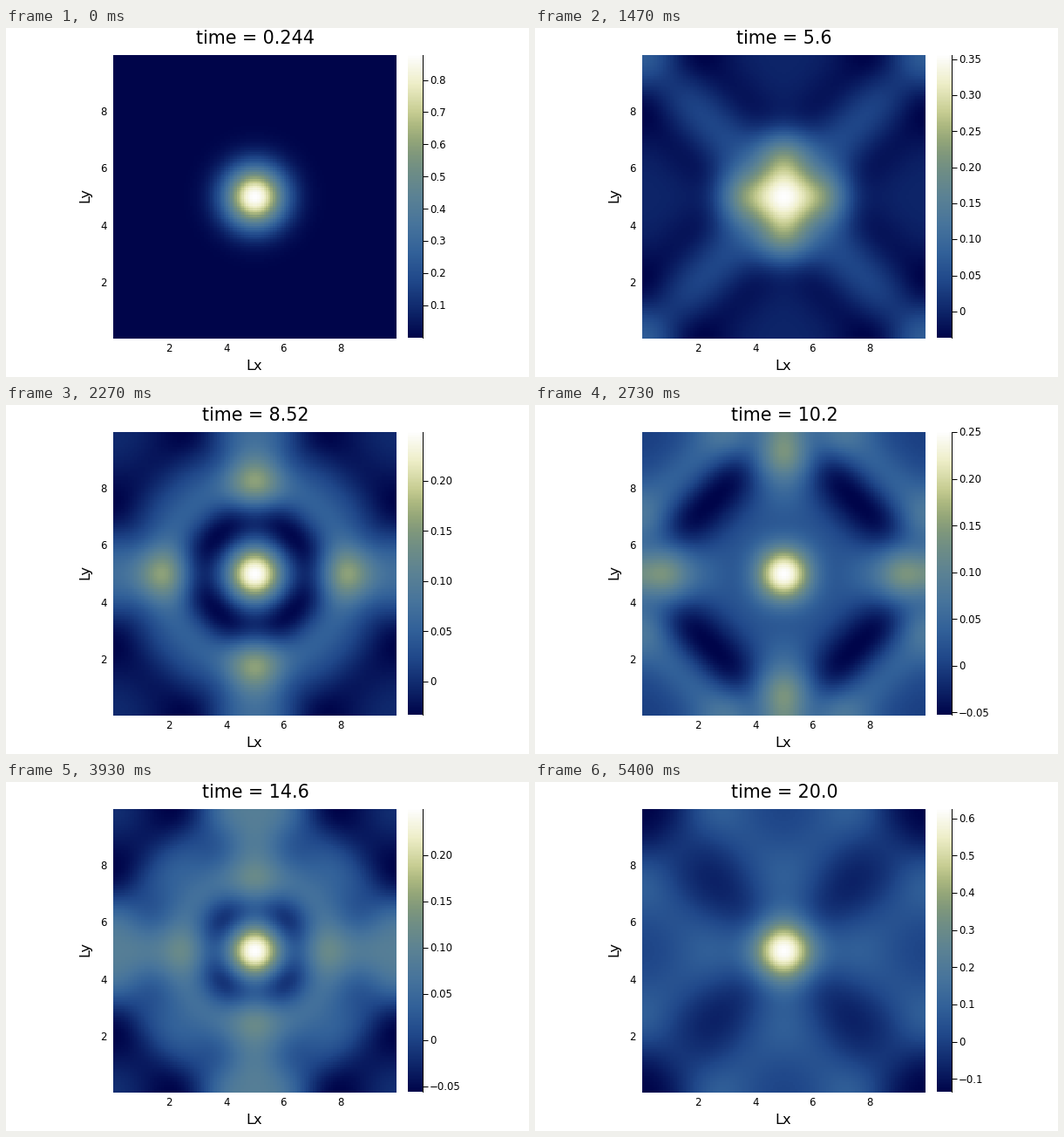
Write a matplotlib script that moves like this. It is 600x400 px and loops after 5470 ms.

```python
import math

import numpy as np
import matplotlib.pyplot as plt
from matplotlib.animation import FuncAnimation
from matplotlib.collections import LineCollection
from matplotlib.colors import LinearSegmentedColormap

W, H, DPI = 600, 400, 100

# fields change 15 times a second; ticks are finer to keep that rhythm
FIELDS, FIELD_MS = 82, 1000 / 15
LOOP_MS, TICKS = 5470, 274
TICK_MS = LOOP_MS / TICKS
ROUNDING_MS = 3.4

# physics and grid
SIZE, N = 10.0, 128
RHO = BULK = SHEAR = 1.0
STEPS_PER_FIELD = 10
DX = SIZE / N
DT = DX / math.sqrt((BULK + 4 / 3 * SHEAR) / RHO) / 2.1

# layout in pixels
LEFT, TOP, SIDE = 123, 31, 325
BAR_LEFT, BAR_RIGHT, BAR_TOP, BAR_BOTTOM = 460.5, 478, 31, 355
TITLE_PX, LABEL_PX, TICK_PX = 20.7, 16.3, 11.8

STOPS = [
    (0.0, (0, 5, 74)), (0.1, (15, 40, 108)), (0.2, (32, 72, 138)),
    (0.3, (50, 97, 153)), (0.4, (71, 116, 156)), (0.5, (91, 130, 148)),
    (0.6, (113, 143, 132)), (0.65, (128, 152, 124)), (0.7, (148, 166, 121)),
    (0.75, (172, 184, 128)), (0.8, (199, 205, 146)), (0.9, (238, 238, 200)),
    (1.0, (254, 254, 254)),
]
CMAP = LinearSegmentedColormap.from_list(
    "ice", [(pos, [c / 255 for c in rgb]) for pos, rgb in STOPS], N=256)

plt.rcParams["font.family"] = "DejaVu Sans"


def simulate():
    """Pressure fields of a wave with normal stresses and rigid walls."""
    x = (np.arange(N) + 0.5) * DX - SIZE / 2
    p = np.exp(-x[:, None] ** 2 - x[None, :] ** 2)
    txx, tyy = np.zeros((N, N)), np.zeros((N, N))
    vx, vy = np.zeros((N + 1, N)), np.zeros((N, N + 1))
    fields = []
    for step in range(1, FIELDS * STEPS_PER_FIELD + 1):
        vx[1:-1] += DT / RHO * np.diff(txx - p, axis=0) / DX
        vy[:, 1:-1] += DT / RHO * np.diff(tyy - p, axis=1) / DX
        exx = np.diff(vx, axis=0) / DX
        eyy = np.diff(vy, axis=1) / DX
        div = exx + eyy
        p -= DT * BULK * div
        txx += DT * 2 * SHEAR * (exx - div / 3)
        tyy += DT * 2 * SHEAR * (eyy - div / 3)
        if step % STEPS_PER_FIELD == 0:
            fields.append(p.T.copy())
    return fields


def bar_ticks(lo, hi):
    """Tick values and labels for the colour bar."""
    span = hi - lo
    power = math.floor(math.log10(span))
    lead = span / 10 ** power
    base = 2 if lead > 5 else 1 if lead > 2.5 else 0.5 if lead > 1 else 0.2
    step = base * 10 ** power / 2
    digits = next(d for d in range(1, 7)
                  if abs(round(step, d) - step) < 1e-9)
    ticks = []
    for k in range(math.ceil((lo + 0.003 * span) / step),
                   math.floor(hi / step) + 1):
        label = f"{k * step:.{digits}f}".replace("-", "\u2212") if k else "0"
        ticks.append((k * step, label))
    return ticks


fields = simulate()

fig = plt.figure(figsize=(W / DPI, H / DPI), dpi=DPI, facecolor="white")

heat_ax = fig.add_axes(
    [LEFT / W, 1 - (TOP + SIDE) / H, SIDE / W, SIDE / H])
heat = heat_ax.imshow(fields[0], cmap=CMAP, origin="lower", aspect="auto",
                      extent=(0, SIZE, 0, SIZE), interpolation="nearest")
low, high = DX / 2, SIZE - DX / 2
heat_ax.set(xlim=(low, high), ylim=(low, high))
heat_ax.axis("off")

page = fig.add_axes([0, 0, 1, 1])
page.axis("off")
page.imshow(np.linspace(1, 0, 256)[:, None], cmap=CMAP, aspect="auto",
            extent=(BAR_LEFT, BAR_RIGHT, BAR_BOTTOM, BAR_TOP),
            interpolation="nearest")
page.set(xlim=(0, W), ylim=(H, 0))
page.plot([BAR_RIGHT] * 2, [BAR_TOP, BAR_BOTTOM], color="black", lw=0.72)


def write(x, y, text, px, **kw):
    return page.text(x, y, text, fontsize=px * 72 / DPI, color="black",
                     va="baseline", **kw)


title = write(286, 18, "", TITLE_PX, ha="center")
write(285, 392, "Lx", LABEL_PX, ha="center")
write(95, 191.5, "Ly", LABEL_PX, ha="center",
      rotation=90, rotation_mode="anchor")
for value in (2, 4, 6, 8):
    offset = (value - low) / (high - low) * SIDE
    write(LEFT + offset, 371, value, TICK_PX, ha="center")
    write(115.5, TOP + SIDE - offset + 4.5, value, TICK_PX, ha="right")

bar_labels = [write(486, 0, "", TICK_PX) for _ in range(12)]
bar_marks = LineCollection([], colors="black", linewidths=0.72)
page.add_collection(bar_marks, autolim=False)


def update(tick):
    # show the field that is due by the end of this tick
    due = (tick + 1) * TICK_MS + ROUNDING_MS
    i = min(int(due / FIELD_MS), FIELDS - 1)
    field = fields[i]
    lo, hi = field.min(), field.max()
    heat.set_data(field)
    heat.set_clim(lo, hi)

    time = (i + 1) * STEPS_PER_FIELD * DT
    title.set_text(f"time = {float(f'{time:.3g}')}")

    for label in bar_labels:
        label.set_text("")
    marks = []
    for label, (value, text) in zip(bar_labels, bar_ticks(lo, hi)):
        y = BAR_BOTTOM - (value - lo) / (hi - lo) * (BAR_BOTTOM - BAR_TOP)
        label.set_text(text)
        label.set_y(y + 4.3)
        marks.append([(BAR_RIGHT, y), (484, y)])
    bar_marks.set_segments(marks)
    return [heat, title, bar_marks, *bar_labels]


anim = FuncAnimation(fig, update, frames=TICKS, interval=TICK_MS,
                     repeat=True, repeat_delay=0, blit=False)
plt.show()
```
